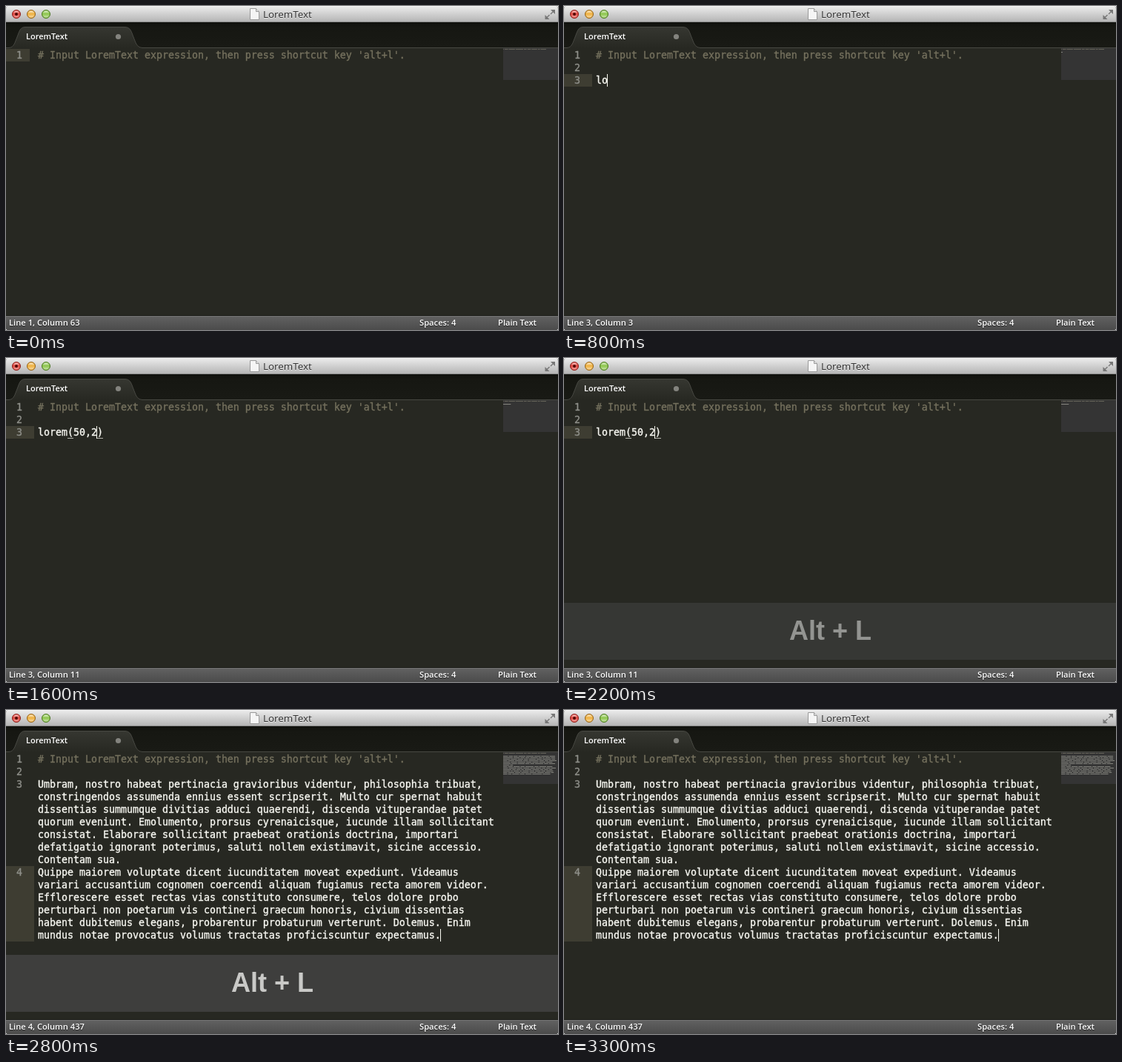
Recreate the animation shown at these times as an HTML page. Size 745 px wide and 438 px high, loop 3800 ms.

```html
<!DOCTYPE html>
<html lang="en">
<head>
<meta charset="utf-8">
<title>LoremText</title>
<style>
  html, body { margin: 0; width: 100%; height: 100%; overflow: hidden; background: #fff; }
  svg { display: block; width: 745px; height: 438px; }
  text { white-space: pre; }
  .ui { font: 600 11.2px "Open Sans", "Noto Sans", sans-serif; fill: #fff; }
  .bar { text-shadow: 0 1px 1px #222; }
  .title { font: 400 13.4px "Open Sans", "Noto Sans", sans-serif; fill: #2c2c2c; text-shadow: 0 1px 0 #eee; }
  .code text { font: 13.29px "DejaVu Sans Mono", monospace; fill: #f8f8f2; stroke: #f8f8f2; stroke-width: .35px; }
  .code .num { fill: #8f908a; stroke: #8f908a; }
  .code .comment { fill: #75715e; stroke: #75715e; }
  .key { font: bold 36px "Liberation Sans", Arial, sans-serif; fill: #fff; }
</style>
</head>
<body>
<svg viewBox="0 0 745 438" xmlns="http://www.w3.org/2000/svg">
  <defs>
    <linearGradient id="chrome" x2="0" y2="1">
      <stop stop-color="#ececec"/><stop offset="1" stop-color="#b3b3b3"/>
    </linearGradient>
    <linearGradient id="strip" x2="0" y2="1">
      <stop stop-color="#10110d"/><stop offset=".2" stop-color="#161712"/><stop offset="1" stop-color="#191a15"/>
    </linearGradient>
    <linearGradient id="tab" x2="0" y2="1">
      <stop stop-color="#363731"/><stop offset="1" stop-color="#272822"/>
    </linearGradient>
    <linearGradient id="status" x2="0" y2="1">
      <stop stop-color="#626262"/><stop offset="1" stop-color="#4b4b4b"/>
    </linearGradient>
    <linearGradient id="gloss" x2="0" y2="1">
      <stop stop-color="#fff" stop-opacity=".75"/><stop offset=".45" stop-color="#fff" stop-opacity="0"/>
      <stop offset="1" stop-color="#fff" stop-opacity=".5"/>
    </linearGradient>
    <clipPath id="window"><path d="M0 4Q0 0 4 0H741Q745 0 745 4V435Q745 438 742 438H3Q0 438 0 435Z"/></clipPath>
  </defs>

  <g clip-path="url(#window)">
    <rect width="745" height="438" fill="#272822"/>

    <!-- title bar -->
    <rect width="745" height="22" fill="url(#chrome)"/>
    <rect width="745" height="1" fill="#f6f6f6"/>
    <rect y="21" width="745" height="1" fill="#8a8a8a"/>
    <g id="lights"></g>
    <circle cx="14" cy="11" r="2" fill="#4d0805"/>
    <path d="M329.5 3.5H337.5L341.5 7.5V18.5H329.5Z" fill="#f5f5f5" stroke="#9a9a9a"/>
    <path d="M337.5 3.5V7.5H341.5" fill="#ddd" stroke="#9a9a9a"/>
    <text class="title" x="347" y="16">LoremText</text>
    <g fill="#777" stroke="#777" stroke-width="1.4">
      <path d="M735 5H741V11Z M733.5 18H727.5V12Z" stroke="none"/>
      <path d="M739 7L735 11M729.5 16L733.5 12" fill="none"/>
    </g>

    <!-- tab strip -->
    <rect y="22" width="745" height="35" fill="url(#strip)"/>
    <path d="M4 57C11 56 12 49 15 42C18 34 19 28.5 26 28.5H160C168 28.5 169 34 172 42C175 49 176 56 184 57Z" fill="url(#tab)"/>
    <path d="M0 56.5H4C11 56 12 49 15 42C18 34 19 28.5 26 28.5H160C168 28.5 169 34 172 42C175 49 176 56 184 56.5H745" fill="none" stroke="#484943"/>
    <text class="ui" x="27" y="45" style="font-size:11px">LoremText</text>
    <circle cx="151.5" cy="41.5" r="3.6" fill="#83837e"/>

    <!-- editor -->
    <rect id="active" fill="#3e3d32"/>
    <rect x="671" y="57" width="74" height="43" fill="#343434"/>
    <path id="mapNote" fill="none" stroke="#66645a"/>
    <path id="mapBody" fill="none" stroke="#85857f"/>
    <g class="code" id="code"></g>
    <path id="brackets" fill="none" stroke="#b5b5ae"/>
    <rect id="caret" width="1" height="17" fill="#f8f8f0"/>

    <g id="overlay">
      <rect y="331" width="745" height="77" fill="#464646"/>
      <text class="key" x="304" y="381">Alt + L</text>
    </g>

    <!-- status bar -->
    <rect y="418" width="745" height="1" fill="#1b1c18"/>
    <rect y="419" width="745" height="19" fill="url(#status)"/>
    <rect y="419" width="745" height="1" fill="#757575"/>
    <g class="ui bar">
      <text id="place" x="4" y="432"></text>
      <text x="558" y="432">Spaces: 4</text>
      <text x="664" y="432">Plain Text</text>
    </g>
  </g>
</svg>

<script>
const LOOP = 3800, TOP = 58, ROW = 17, LEFT = 43, CHAR = 8;
const NOTE = "# Input LoremText expression, then press shortcut key 'alt+l'.";
const LOREM = [
  'Umbram, nostro habeat pertinacia gravioribus videntur, philosophia tribuat,',
  'constringendos assumenda ennius essent scripserit. Multo cur spernat habuit',
  'dissentias summumque divitias adduci quaerendi, discenda vituperandae patet',
  'quorum eveniunt. Emolumento, prorsus cyrenaicisque, iucunde illam sollicitant',
  'consistat. Elaborare sollicitant praebeat orationis doctrina, importari',
  'defatigatio ignorant poterimus, saluti nollem existimavit, sicine accessio.',
  'Contentam sua.',
  'Quippe maiorem voluptate dicent iucunditatem moveat expediunt. Videamus',
  'variari accusantium cognomen coercendi aliquam fugiamus recta amorem videor.',
  'Efflorescere esset rectas vias constituto consumere, telos dolore probo',
  'perturbari non poetarum vis contineri graecum honoris, civium dissentias',
  'habent dubitemus elegans, probarentur probaturum verterunt. Dolemus. Enim',
  'mundus notae provocatus volumus tractatas proficiscuntur expectamus.'
];
const $ = id => document.getElementById(id);

function add(parent, tag, attrs) {
  const el = document.createElementNS('http://www.w3.org/2000/svg', tag);
  set(el, attrs);
  return parent.appendChild(el);
}
function set(el, attrs) {
  for (const k in attrs) el.setAttribute(k, attrs[k]);
}

[['#e0443c', '#8c211c'], ['#eeb03f', '#94631a'], ['#8cc54b', '#4c7a23']].forEach(([fill, stroke], i) => {
  const cx = 14 + 20 * i;
  add($('lights'), 'circle', { cx, cy: 11, r: 5.5, fill, stroke });
  add($('lights'), 'circle', { cx, cy: 11, r: 4.5, fill: 'url(#gloss)' });
});

const rows = Array.from({ length: LOREM.length + 2 }, (_, i) => {
  const y = TOP + 13 + ROW * i;
  return {
    num: add($('code'), 'text', { x: 14, y, class: 'num' }),
    line: add($('code'), 'text', { x: LEFT, y, class: i ? '' : 'comment' })
  };
});

// Minimap strokes: one dash per word
const dashes = (text, row) => [...text.matchAll(/\S+/g)].map(m =>
  `M${(671 + m.index * .935).toFixed(1)} ${58.5 + row * 2}h${(m[0].length * .935).toFixed(1)}`).join('');

// Document, caret and status for a moment in the loop
function stateAt(t) {
  const s = { lines: [NOTE], row: 0, first: 0, span: 1, col: 63, caret: t >= 300, gutter: t < 300 ? 32 : 38 };
  if (t < 500) return s;
  if (t >= 2300) {
    s.lines = [NOTE, '', ...LOREM];
    return { ...s, row: 14, first: 9, span: 6, col: 437, caret: t < 3100 || t >= 3300 };
  }
  const n = Math.min(11, Math.floor((t - 500) / 100));
  if (n === 0) return { ...s, lines: [NOTE, ''], row: 1, first: 1, col: 1 };
  const open = n >= 7;
  const text = open ? `lorem(${'50,2'.slice(0, n - 7)})` : 'lorem'.slice(0, n - 1);
  return { ...s, lines: [NOTE, '', text], row: 2, first: 2, open, col: text.length + (open ? 0 : 1) };
}

function opacityAt(t) {
  if (t < 2100 || t >= 3100) return 0;
  const up = Math.floor((t - 2000) / 100), down = Math.floor((3199 - t) / 100);
  return Math.min(up, down, 4) / 4;
}

function lineNumber(i, count) {
  return i >= count ? '' : i < 3 ? i + 1 : i === 9 ? 4 : '';
}

function draw(t) {
  const s = stateAt(t), count = s.lines.length;
  rows.forEach((r, i) => {
    r.num.textContent = lineNumber(i, count);
    r.line.textContent = s.lines[i] || '';
  });
  set($('active'), { y: TOP + ROW * s.first, width: s.gutter, height: ROW * s.span });

  const y = TOP + ROW * s.row, end = count > 3 ? s.lines[s.row].length : s.col - 1;
  set($('caret'), { x: LEFT - 1 + CHAR * end, y, opacity: s.caret ? 1 : 0 });
  set($('brackets'), { d: s.open ? `M83 ${y + 16.5}h8M${LEFT + CHAR * end} ${y + 16.5}h8` : '' });

  set($('mapNote'), { d: dashes(NOTE, 0) });
  set($('mapBody'), { d: s.lines.map((l, i) => i ? dashes(l, i) : '').join('') });
  set($('overlay'), { opacity: opacityAt(t) });
  $('place').textContent = `Line ${count > 3 ? 4 : s.row + 1}, Column ${s.col}`;
}

const start = performance.now();
let last = -1;
function tick() {
  const t = (performance.now() - start) % LOOP;
  const step = Math.floor(t / 100);
  if (step !== last) draw(t);
  last = step;
  requestAnimationFrame(tick);
}
tick();
</script>
</body>
</html>
```
